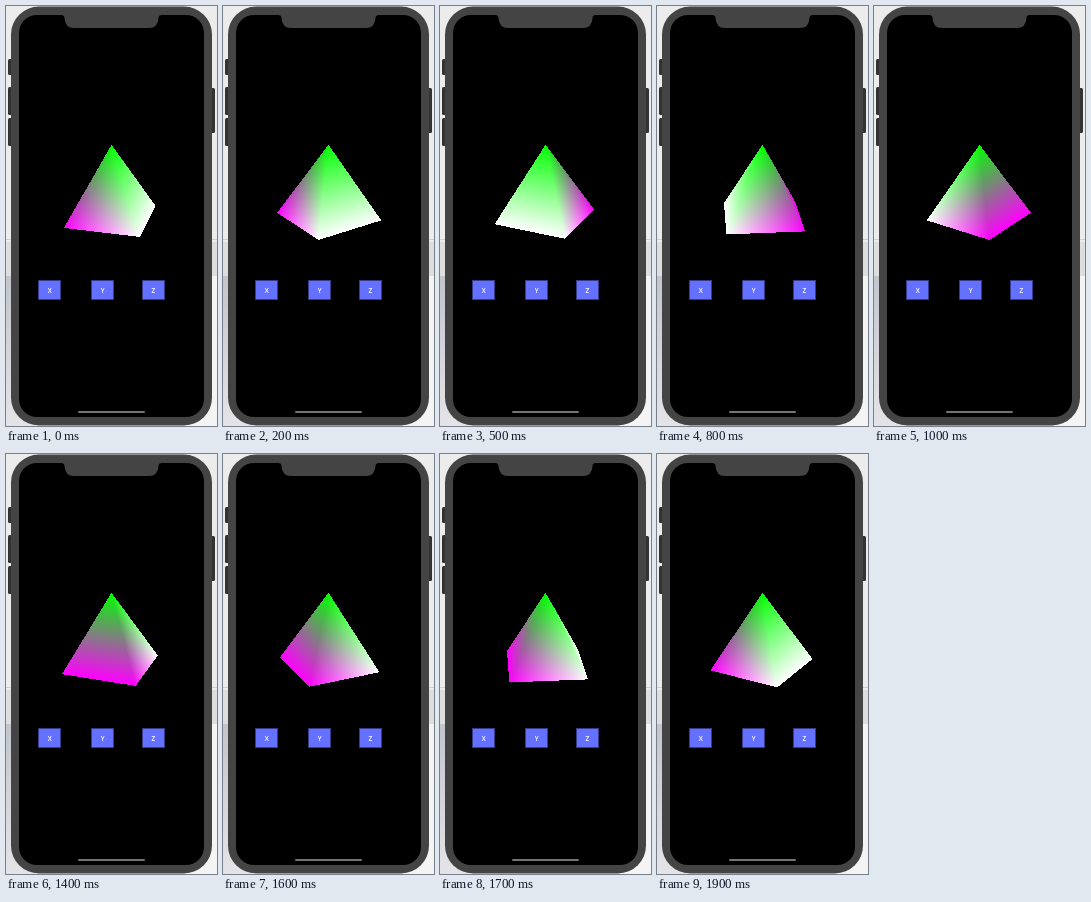
Animation of 211x420 px, one loop 2 s. Source, as an HTML page with a canvas:

```html
<!DOCTYPE html>
<html lang="en">
<head>
<meta charset="utf-8">
<title>Spinning pyramid</title>
<style>
  html, body { margin: 0; width: 100%; height: 100%; overflow: hidden; background: #ececec; }
  svg, canvas { position: absolute; left: 0; top: 0; display: block; }
  text { font: 600 6.5px "Open Sans", Roboto, sans-serif; fill: #fff; text-anchor: middle; }
</style>
</head>
<body>
<svg width="211" height="420" viewBox="0 0 211 420">
  <defs>
    <linearGradient id="shade" x2="0" y2="1">
      <stop stop-color="#c4c4cc"/>
      <stop offset="1" stop-color="#e4e4e8"/>
    </linearGradient>
  </defs>
  <rect width="211" height="420" fill="#ececec"/>
  <rect y="233" width="211" height="1" fill="#cfcfcf"/>
  <rect y="236" width="211" height="34" fill="#dedede"/>
  <rect y="270" width="211" height="150" fill="#f4f4f4"/>
  <rect y="270" width="30" height="150" fill="url(#shade)"/>
  <g fill="#333">
    <rect x="2" y="53" width="5" height="16" rx="1.5"/>
    <rect x="2" y="81" width="5" height="28" rx="1.5"/>
    <rect x="2" y="112" width="5" height="28" rx="1.5"/>
    <rect x="203" y="82" width="6" height="45" rx="1.5"/>
  </g>
  <rect x="5" y="0.500" width="201" height="419" rx="28" fill="#444"/>
  <rect x="13" y="9" width="185" height="402" rx="18"/>
  <path d="M55 8V9Q58.500 9 58.500 12Q59 22 68 22H143Q152 22 152.500 12Q152.500 9 156 9V8Z" fill="#444"/>
  <rect x="72" y="405" width="67" height="2" rx="1" fill="#757575"/>
  <g fill="#6470ff" stroke="#363c88">
    <rect x="32.500" y="274.500" width="22" height="19"/>
    <rect x="85.500" y="274.500" width="22" height="19"/>
    <rect x="136.500" y="274.500" width="22" height="19"/>
  </g>
  <text x="43.700" y="286.800">X</text>
  <text x="96.700" y="286.800">Y</text>
  <text x="147.300" y="286.800">Z</text>
</svg>
<canvas id="stage" width="211" height="420"></canvas>
<script>
const ctx = document.getElementById('stage').getContext('2d');
const GREEN = [0, 255, 0], MAGENTA = [255, 0, 255], WHITE = [255, 255, 255];
const apex = { x: 105.5, y: 138.8, color: GREEN };
const baseColors = [MAGENTA, WHITE, WHITE, MAGENTA];

// Base corner in perspective, seen from above; 0 degrees faces the viewer.
function corner(degrees, color) {
  const a = degrees * Math.PI / 180, depth = Math.cos(a);
  const scale = 1 / (1 - 0.077 * depth);
  return { x: 105.5 + 52.8 * Math.sin(a) * scale, y: 210.5 + 22 * depth * scale, color };
}

const cross = (p, q, x, y) => (q.x - p.x) * (y - p.y) - (q.y - p.y) * (x - p.x);

function fillFace(image, p, q, r) {
  const area = cross(p, q, r.x, r.y);
  if (area >= 0) return; // facing away
  const xs = [p.x, q.x, r.x], ys = [p.y, q.y, r.y];
  for (let y = Math.floor(Math.min(...ys)); y <= Math.max(...ys); y++) {
    for (let x = Math.floor(Math.min(...xs)); x <= Math.max(...xs); x++) {
      const cx = x + 0.5, cy = y + 0.5;
      const u = cross(q, r, cx, cy) / area;
      const v = cross(r, p, cx, cy) / area;
      const w = 1 - u - v;
      if (u < 0 || v < 0 || w < 0) continue;
      const at = (y * image.width + x) * 4;
      for (let c = 0; c < 3; c++) {
        image.data[at + c] = u * p.color[c] + v * q.color[c] + w * r.color[c];
      }
      image.data[at + 3] = 255;
    }
  }
}

function draw(step) {
  // Turns 20 degrees a step, with every fifth step slightly late.
  const turn = -60 - 20 * step + (step % 5 === 4 ? 5 : 0);
  const base = baseColors.map((color, i) => corner(turn + 90 * i, color));
  const image = ctx.createImageData(211, 420);
  base.forEach((p, i) => fillFace(image, apex, p, base[(i + 1) % 4]));
  ctx.putImageData(image, 0, 0);
}

const start = performance.now();
let shown = -1;
function tick() {
  const step = Math.floor((performance.now() - start) % 2000 / 100);
  if (step !== shown) draw(shown = step);
  requestAnimationFrame(tick);
}
tick();
</script>
</body>
</html>
```
